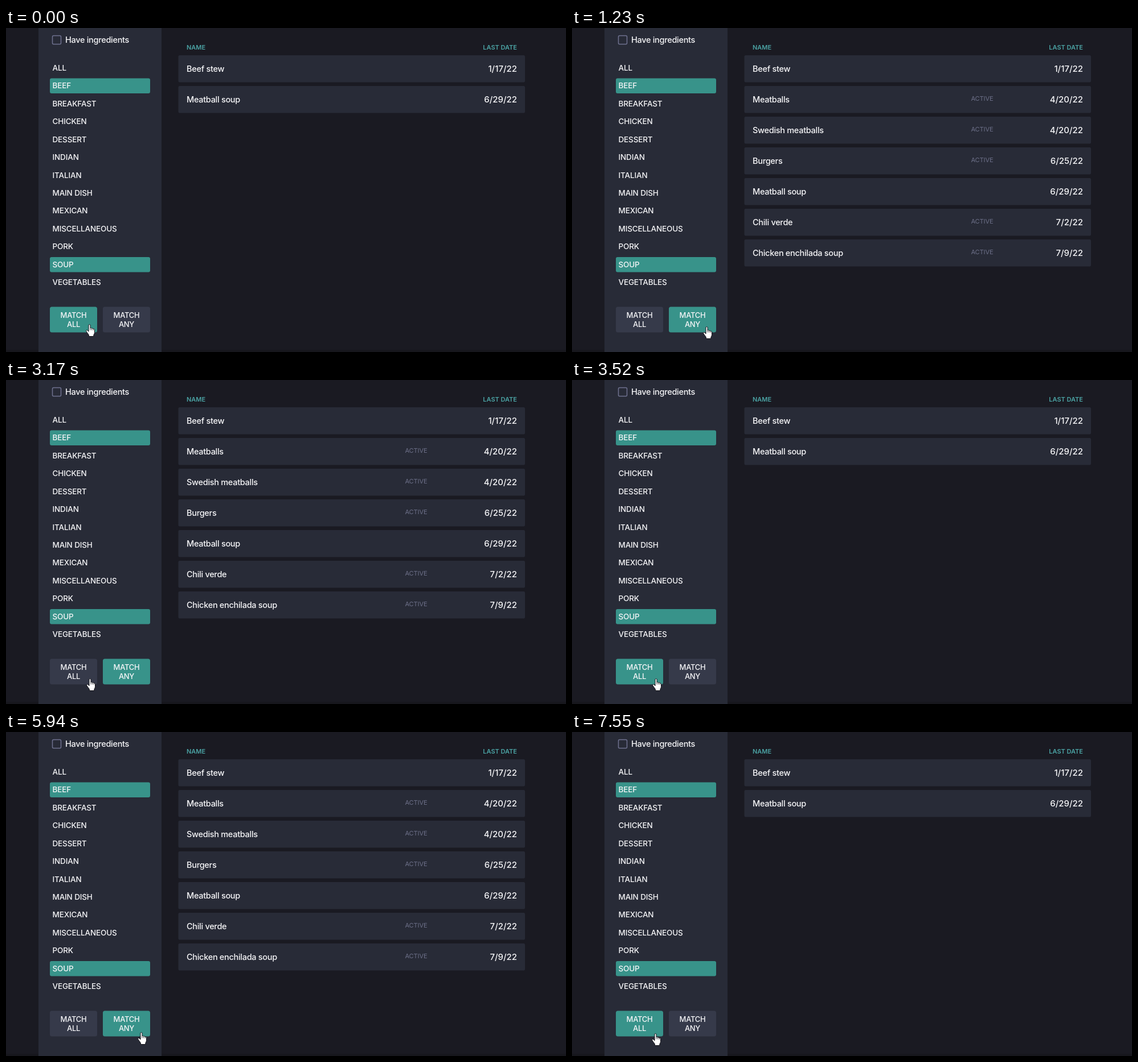
An HTML page for the animation above (8000 ms loop, 983 by 570 pixels).

```html
<!DOCTYPE html>
<html lang="en">
<head>
<meta charset="utf-8">
<title>Recipe filter</title>
<style>
  html, body { margin: 0; width: 100%; height: 100%; overflow: hidden; background: #1a1a22; }
  svg { display: block; width: 983px; height: 570px; }
  text { font-family: Inter, sans-serif; font-weight: 500; fill: #f6f6f8; }
  .label { font-size: 14.5px; letter-spacing: -.3px; }
  .date { font-size: 15px; text-anchor: end; }
  .tag { font-size: 13.5px; letter-spacing: -.15px; }
  .button { font-size: 13px; letter-spacing: -.3px; text-anchor: middle; }
  .head { font-size: 11px; font-weight: 600; fill: #4ba3a4; }
  .end { text-anchor: end; }
  .active { font-size: 11px; font-weight: 400; letter-spacing: -.1px; fill: #6d7089; }
</style>
</head>
<body>
<svg id="stage" viewBox="0 0 983 570"></svg>
<script>
const LOOP = 8000;
const TEAL = '#38938a', PANEL = '#282b37', IDLE = '#363a4a';
const stage = document.getElementById('stage');

function add(parent, name, attrs, content) {
  const node = document.createElementNS('http://www.w3.org/2000/svg', name);
  for (const key in attrs) node.setAttribute(key, attrs[key]);
  if (content) node.textContent = content;
  return parent.appendChild(node);
}
const box = (parent, x, y, width, height, fill, rx = 0) =>
  add(parent, 'rect', { x, y, width, height, fill, rx });
const label = (parent, x, y, style, content) =>
  add(parent, 'text', { x, y, class: style }, content);

box(stage, 0, 566, 983, 4, '#17171d');
box(stage, 57, 0, 216, 570, PANEL);
add(stage, 'rect', { x: 81.5, y: 13.5, width: 15, height: 15, rx: 2,
  fill: 'none', stroke: '#6f7290', 'stroke-width': 1.5 });
label(stage, 104, 26, 'label', 'Have ingredients');

const tags = ['ALL', 'BEEF', 'BREAKFAST', 'CHICKEN', 'DESSERT', 'INDIAN', 'ITALIAN',
  'MAIN DISH', 'MEXICAN', 'MISCELLANEOUS', 'PORK', 'SOUP', 'VEGETABLES'];
tags.forEach((tag, i) => {
  const y = 70 + 31.45 * i;
  if (tag === 'BEEF' || tag === 'SOUP') box(stage, 77, y - 13, 176, 26.5, TEAL, 3);
  label(stage, 81.5, Math.round(y + 4.8), 'tag', tag);
});

function makeButton(x, word) {
  const face = box(stage, x, 490.5, 83, 45, IDLE, 3.5);
  label(stage, x + 41.5, 510, 'button', 'MATCH');
  label(stage, x + 41.5, 526, 'button', word);
  return face;
}
const allButton = makeButton(77, 'ALL');
const anyButton = makeButton(170, 'ANY');

label(stage, 317, 37.5, 'head', 'NAME');
label(stage, 897, 37.5, 'head end', 'LAST DATE');

const recipes = [
  ['Beef stew', '1/17/22'],
  ['Meatballs', '4/20/22', true],
  ['Swedish meatballs', '4/20/22', true],
  ['Burgers', '6/25/22', true],
  ['Meatball soup', '6/29/22'],
  ['Chili verde', '7/2/22', true],
  ['Chicken enchilada soup', '7/9/22', true]
];
function makeList(rows) {
  const list = add(stage, 'g', {});
  rows.forEach(([name, date, active], i) => {
    const y = 48 + 54 * i;
    box(list, 302.5, y, 608.5, 47.5, PANEL, 2.5);
    label(list, 317, y + 29, 'label', name);
    if (active) label(list, 700.5, y + 26, 'active', 'ACTIVE');
    label(list, 897, y + 29, 'date', date);
  });
  return list;
}
const anyList = makeList(recipes);
const allList = makeList([recipes[0], recipes[4]]);

const hand = add(stage, 'g', { stroke: '#111117', 'stroke-linejoin': 'round' });
add(hand, 'path', { fill: '#fff', d: 'M5 1.9C5 .2 8 .2 8 1.9V7C8.5 6.2 10.3 6.4 10.6 7.6' +
  'C11.5 6.9 13 7.3 13.2 8.5C14.2 8 15.5 8.6 15.5 10V14.5C15.5 17 13.8 18 13.8 19.5V21.5' +
  'H5.5V19.5C5 17.5 2 15 .8 12.2C.2 10.6 2 9.8 3.2 11L5 13Z' });
add(hand, 'path', { fill: 'none', 'stroke-width': .8, d: 'M8 7v3.5M10.6 7.6v3M13.2 8.5v2.5' });

// Pointer moves: start, end, number of steps, target x, target y, vertical bow
const moves = [
  [500, 860, 13, 230, 525, 3],
  [2580, 3170, 17, 141, 525, -1],
  [4660, 5020, 12, 228.5, 528, 0],
  [5190, 5260, 2, 231, 528, 0],
  [6140, 6570, 12, 140, 530, 0]
];
function pointerAt(time) {
  let x = 140, y = 521;
  for (const [start, end, steps, toX, toY, bow] of moves) {
    if (time < start) break;
    const step = Math.floor((time - start) / (end - start) * (steps - 1)) + 1;
    const p = Math.min(1, step / steps);
    const eased = Math.sin(p * Math.PI / 2);
    x += (toX - x) * eased;
    y += (toY - y) * eased + bow * Math.sin(p * Math.PI);
  }
  return [Math.round(x), Math.round(y)];
}

const toggles = [1230, 3520, 5940, 7550];
function render(time) {
  const any = toggles.filter(at => time >= at).length % 2 === 1;
  allButton.setAttribute('fill', any ? IDLE : TEAL);
  anyButton.setAttribute('fill', any ? TEAL : IDLE);
  anyList.style.display = any ? '' : 'none';
  allList.style.display = any ? 'none' : '';
  hand.setAttribute('transform', `translate(${pointerAt(time)})`);
}

const began = performance.now();
function tick() {
  render((performance.now() - began) % LOOP);
  requestAnimationFrame(tick);
}
tick();
</script>
</body>
</html>
```
